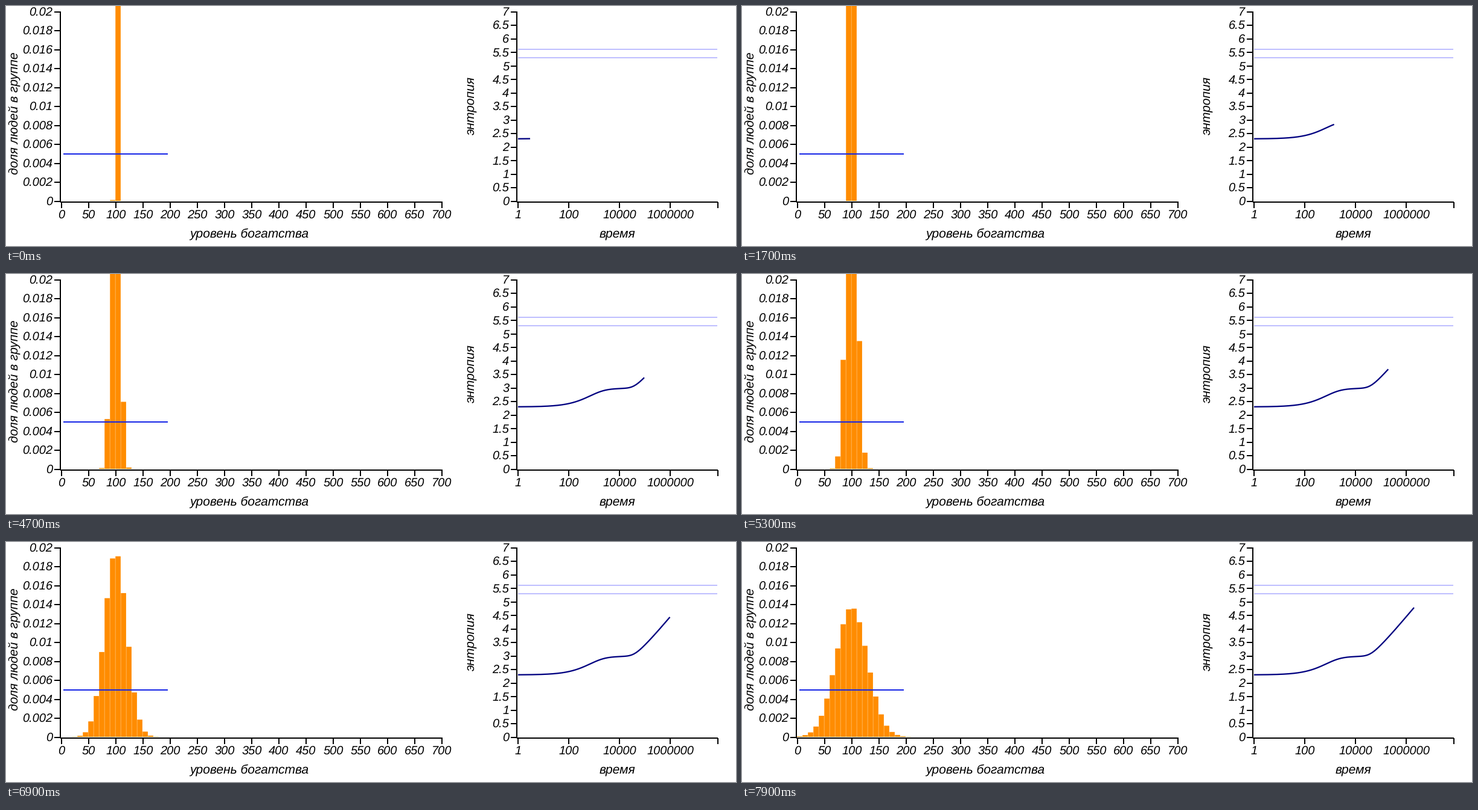
Write a matplotlib script that moves like this. It is 1209 px wide and 399 px high and loops after 8000 ms.

```python
import numpy as np
import matplotlib.pyplot as plt
from matplotlib.animation import FuncAnimation
from matplotlib.patches import Rectangle

W, H, DPI = 1209, 399, 100
FRAMES, STEP_MS = 80, 100
PX = 72 / DPI
BASE = 324.5            # y of zero in both charts
LEFT, RIGHT = 91, 848   # x of zero wealth / of time 1
DECADE = 42             # pixels per decade of time
GROUP, GROUPS = 10, 25
START = 100             # everyone's wealth at the beginning

plt.rcParams["font.family"] = "Liberation Sans"
plt.rcParams["font.style"] = "italic"
plt.rcParams["text.hinting"] = "no_hinting"

fig = plt.figure(figsize=(W / DPI, H / DPI), dpi=DPI, facecolor="white")
ax = fig.add_axes([0, 0, 1, 1])
ax.set_xlim(0, W)
ax.set_ylim(H, 0)
ax.axis("off")


def line(xs, ys, color="black", width=2, z=3):
    return ax.plot(xs, ys, color=color, lw=width * PX, zorder=z,
                   solid_capstyle="butt")[0]


def label(x, y, text, size=20, ha="center", rotation=0):
    ax.text(x, y, text, fontsize=size * PX, ha=ha, va="baseline",
            rotation=rotation, rotation_mode="anchor")


def draw_axes(x0, x1, y_values, y_step, x_ticks):
    line([x0, x0], [9, 326])
    line([x0, x1 + 1], [326, 326])
    for i, value in enumerate(y_values):
        y = 324.9 - y_step * i
        line([x0 - 10, x0 + 1], [y, y])
        label(x0 - 12.7, y + 6.6, f"{value:g}", ha="right")
    for x, text in x_ticks:
        line([x, x], [326, 336])
        label(x, 353.3, text)


draw_axes(90, 722, np.arange(11) * 0.002, 31.5,
          [(92 + 0.9 * v, str(v)) for v in range(0, 701, 50)])
draw_axes(846, 1178, np.arange(15) * 0.5, 22.5,
          [(RIGHT + 2 * DECADE * k, str(100 ** k)) for k in range(4)]
          + [(1178.5, "")])
label(403, 384.3, "уровень богатства", 21)
label(1012.5, 384.3, "время", 21)
label(19.3, 178.5, "доля людей в группе", 21, rotation=90)
label(775.3, 165.5, "энтропия", 21, rotation=90)

line([94.5, 267.5], [246, 246], "#1423e6", z=5)
for y in (72, 86):
    line([RIGHT, 1178], [y, y], "#bfbfff", z=2)

bars = [ax.add_patch(Rectangle((LEFT + 9 * i + 0.25, 324), 8.65, 0,
                               fc="#ff8c00", lw=0, snap=False, zorder=1))
        for i in range(GROUPS)]
curve = line([], [], "#000080", 2.3, z=5)


def shares(x):
    """Share of people per wealth group at the times under the given x."""
    time = 10 ** ((np.atleast_1d(x) - RIGHT) / DECADE)
    variance = 6.23e-4 * time ** 0.9715
    # Random walk on a ring, from its characteristic function
    theta = 2 * np.pi * np.arange(513) / 1024
    spread = np.exp(np.outer(variance, np.cos(theta) - 1))
    p = np.roll(np.fft.irfft(spread, 1024), START, axis=1)
    p = p[:, :GROUP * GROUPS].reshape(-1, GROUPS, GROUP).sum(axis=2)
    return np.clip(p, 1e-15, 1)


def entropy(p):
    return -(p * np.log(p / GROUP)).sum(axis=1)


grid_x = np.arange(RIGHT, 1120)
grid_y = BASE - 45 * entropy(shares(grid_x))

# Time runs as a power of the step number between a few key points
KEY_STEP = np.log(np.array([0, 9, 18, 31, 47, 69, 79]) + 1)
KEY_X = [868, 955, 983, 1016, 1057, 1099.5, 1113]


def update(frame):
    end = np.interp(np.log(frame + 1), KEY_STEP, KEY_X)
    for bar, share in zip(bars, shares(end)[0]):
        bar.set_visible(share > 2e-4)
        bar.set_height(-share / GROUP * 15750)
    xs = np.append(np.arange(RIGHT, end), end)
    curve.set_data(xs, np.interp(xs, grid_x, grid_y))
    return bars + [curve]


anim = FuncAnimation(fig, update, frames=FRAMES, interval=STEP_MS,
                     init_func=lambda: update(0), repeat=True, repeat_delay=0)
plt.show()
```
